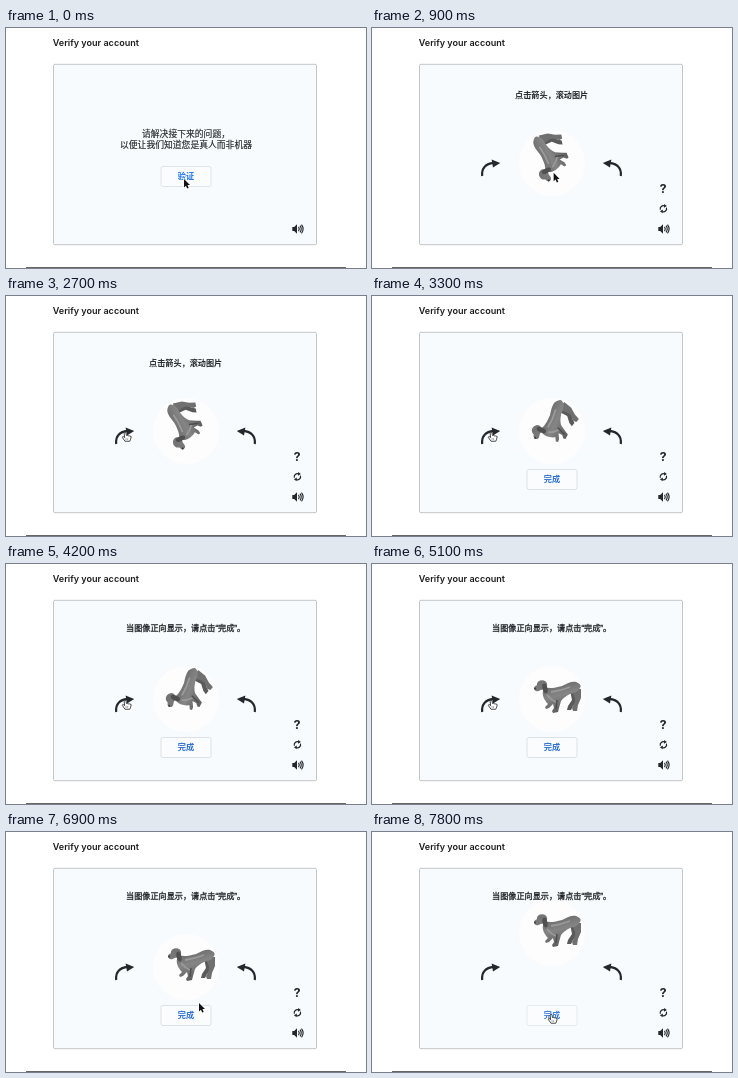
Recreate the animation shown at these times as an HTML page with a canvas. Size 360 by 240 pixels, loop 8000 ms.

```html
<!DOCTYPE html>
<html lang="en">
<head>
<meta charset="utf-8">
<title>Verify your account</title>
<style>
  html, body { margin: 0; width: 100%; height: 100%; overflow: hidden; background: #fff; }
  canvas { display: block; width: 360px; height: 240px; }
</style>
</head>
<body>
<canvas id="stage"></canvas>
<script>
const LOOP = 8000, STEP = 300, TURN = 360 / 7;
const canvas = document.getElementById('stage');
const dpr = window.devicePixelRatio || 1;
canvas.width = 360 * dpr;
canvas.height = 240 * dpr;
const ctx = canvas.getContext('2d');
const CJK = '"Liberation Sans", "Noto Sans CJK SC", "Noto Sans CJK", sans-serif';
const INK = '#24272b';

// time, x, y of the pointer tip
const route = [
  [0, 178, 151], [600, 178, 151], [1500, 192, 127], [1800, 192, 127], [2400, 119, 136],
  [5400, 119, 136], [6000, 233, 136], [6300, 233, 136], [6900, 193, 171], [7200, 179, 182], [8000, 179, 182]
];

function pointer(t) {
  const i = Math.max(1, route.findIndex(p => p[0] >= t));
  const [t0, x0, y0] = route[i - 1], [t1, x1, y1] = route[i];
  const k = (t - t0) / (t1 - t0), e = k * k * (3 - 2 * k);
  return [x0 + (x1 - x0) * e, y0 + (y1 - y0) * e];
}

function at(x, y, draw, turn = 0, sx = 1, sy = sx) {
  ctx.save();
  ctx.translate(x, y);
  ctx.rotate(turn * Math.PI / 180);
  ctx.scale(sx, sy);
  draw();
  ctx.restore();
}

function fill(d, color) {
  ctx.fillStyle = color;
  ctx.fill(new Path2D(d));
}

function line(d, color, width) {
  ctx.strokeStyle = color;
  ctx.lineWidth = width;
  ctx.stroke(new Path2D(d));
}

function oval(x, y, rx, ry, color, turn = 0) {
  ctx.fillStyle = color;
  ctx.beginPath();
  ctx.ellipse(x, y, rx, ry, turn, 0, 7);
  ctx.fill();
}

// a thin outline gives the medium weight
function text(s, x, y, font, color = INK, align = 'center', outline = 0) {
  ctx.font = font;
  ctx.fillStyle = ctx.strokeStyle = color;
  ctx.textAlign = align;
  ctx.fillText(s, x, y);
  if (outline) {
    ctx.lineWidth = outline;
    ctx.strokeText(s, x, y);
  }
}

function box(x, y, w, h, r, bg, edge) {
  ctx.beginPath();
  ctx.roundRect(x, y, w, h, r);
  ctx.fillStyle = bg;
  ctx.fill();
  ctx.strokeStyle = edge;
  ctx.lineWidth = 1;
  ctx.stroke();
}

function button(label, y, color, edge) {
  box(155, y + 0.5, 50, 20, 2, '#fafcfe', edge);
  text(label, 180, y + 12.8, 'bold 8.2px ' + CJK, color);
}

function speaker() {
  fill('M-5-2H-3L0-5V5L-3 2H-5Z', INK);
  line('M1.6-2.2Q3.2 0 1.6 2.2M3.2-3.6Q5.8 0 3.2 3.6M4.8-4.6Q8.2 0 4.8 4.6', INK, 1.2);
}

function refresh() {
  line('M-3.3 1.2A3.5 3.5 0 0 1 1.4-3.1M3.3-1.2A3.5 3.5 0 0 1-1.4 3.1', INK, 1.3);
  fill('M.8-5L3.8-2.8L.6-.9ZM-.8 5L-3.8 2.8L-.6.9Z', INK);
}

function arrow() {
  line('M-8.8 7.5C-9.8-.8-5-4.8 2.6-5.6', INK, 2.2);
  fill('M.6-9L9.2-5.6L2-1.1Z', INK);
}

function dog() {
  const coat = ctx.createLinearGradient(-2, -14, 6, 16);
  coat.addColorStop(0, '#686868');
  coat.addColorStop(0.45, '#858585');
  coat.addColorStop(1, '#5a5a5a');
  // hind legs
  fill('M17-7L19 3L15 9L14 13L18 13L20 9L24 4L26-6Z', '#5a5a5a');
  fill('M19-8C20-2 23 1 22 5L19 11L20 14H24L25 8L28 1L28-8Z', '#707070');
  // trunk, tail and forelegs
  fill('M-9-10C-4-8 2-9 9-11C15-14 21-17 25-14Q29-12 27-9C25-5 21-4 17-3C13-1 10 1 8 4L6 11L5 15L0 16L-1 14L1 11L0 7L-4 11L-7 12L-8 10L-5 7C-9 3-11-2-10-6Z', coat);
  line('M-2-5Q7-6 17-10M-6-2Q-2 3 3 5', '#9a9a9a', 1.8);
  line('M4 3L3 12', '#4c4c4c', 1.4);
  // head
  oval(-11, -12, 5.2, 4.8, '#747474');
  oval(-15, -9, 4, 2.9, '#787878', -0.4);
  oval(-8, -8.5, 2.4, 5, '#505050', -0.25);
  oval(-18, -8.4, 1, 1, '#3c3c3c');
}

function mouse() {
  const d = 'M0 0V8.4L1.9 6.7L3.2 9.6L4.7 8.9L3.5 6.1H6Z';
  line(d, '#fff', 1.3);
  fill(d, '#111');
}

function hand() {
  const d = 'M-1 1Q0-.8 1.2 1L1.6 4Q3 3.6 3.7 4.4Q5 3.8 5.6 4.9Q7 4.2 7 5.6L6.4 8.2L5.4 10.5H0L-3 6.2Q-3 4.6-1.4 5.5L-.4 6.4Z';
  fill(d, '#fff');
  line(d, '#333', 1);
  line('M1.2 7V9M3 7V9', '#555', 0.6);
}

function puzzle(t) {
  const tried = t >= 3000, leaving = t >= 7800;
  const angle = t < 3000 ? -2 : t < 4500 ? -1 : t < 5400 ? 0 : t < 6300 ? 1 : 0;
  const rise = leaving ? -34 : 0;
  oval(180, 135 + rise, 33, 33, '#fdfdfe');
  at(181, 133 + rise, dog, angle * TURN);

  at(119, 140.5, arrow);
  at(240, 140.5, arrow, 0, -1, 1);

  if (!tried) text('点击箭头，滚动图片', 179.6, 69.8, 'bold 8.15px ' + CJK);
  else if (t >= 3600) text('当图像正向显示，请点击“完成”。', 179.6, 66.8, '8.15px ' + CJK, INK, 'center', 0.3);
  if (tried) button('完成', 173, t >= 7200 ? '#3b7de4' : '#2b70d0', leaving ? '#e8ebee' : '#dce1e6');

  text('?', 291, 164.5, 'bold 13.5px Roboto, sans-serif');
  at(291.4, 180.7, refresh, 0, 0.92);
}

function intro() {
  text('请解决接下来的问题，', 180, 108.8, '8.8px ' + CJK, INK, 'center', 0.15);
  text('以便让我们知道您是真人而非机器', 180, 119.8, '8.8px ' + CJK, INK, 'center', 0.15);
  button('验证', 138, '#1a6fe8', '#e0e4e9');
}

function render(t) {
  ctx.setTransform(dpr, 0, 0, dpr, 0, 0);
  ctx.fillStyle = '#fff';
  ctx.fillRect(0, 0, 360, 240);
  text('Verify your account', 46.8, 17.8, '600 9.05px Inter, sans-serif', '#1d1d1f', 'left');
  box(47.5, 36.3, 263, 180.4, 1.5, '#f8fbfd', '#c3c6c9');
  ctx.fillStyle = '#666';
  ctx.fillRect(20, 239, 320, 1);

  if (t < 900) intro();
  else puzzle(t);
  at(291, 201, speaker, 0, 0.94);

  const [x, y] = pointer(t);
  const overHand = t >= 2400 && t <= 5400 || t >= 6000 && t <= 6300 || t >= 7200;
  at(x, y, overHand ? hand : mouse, 0, overHand ? 0.88 : 1);
}

function tick(now) {
  const t = now % LOOP;
  render(Math.floor(t / STEP) * STEP);
  requestAnimationFrame(tick);
}
requestAnimationFrame(tick);
</script>
</body>
</html>
```
